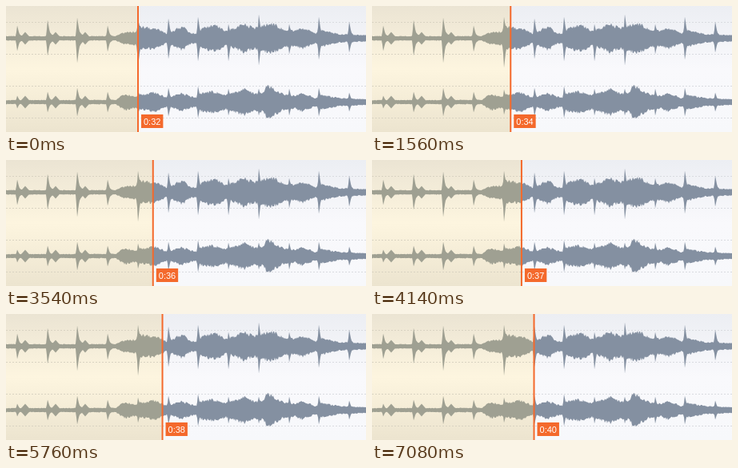
Animation, 450 px wide and 158 px high, one loop 7.14 s. Source, as an HTML page with a canvas:

```html
<!DOCTYPE html>
<html>
<head>
<meta charset="utf-8">
<title>Audio player</title>
<style>
html, body { margin: 0; width: 450px; height: 158px; overflow: hidden; }
canvas { display: block; }
</style>
</head>
<body>
<canvas id="stage" width="450" height="158"></canvas>
<script>
const W = 450, H = 158, LOOP = 7140, STEP = 60;
const ctx = document.getElementById('stage').getContext('2d');

// Loudness over x: [x, top channel, bottom channel]
const body = [
  [0, 2.7, 2.4], [137, 2.7, 2.7], [148, 7.5, 10], [162, 8.5, 7],
  [167, 14, 9], [186, 12.5, 12], [201, 6, 6], [210, 10, 8],
  [220, 15, 11], [231, 6.5, 7], [238, 6, 6], [244, 11, 11],
  [256, 16.5, 13], [266, 14.5, 12], [275, 9, 9], [285, 12.5, 12],
  [297, 17.5, 16], [310, 13, 11], [322, 15.5, 12], [327, 17, 22],
  [333, 18, 17], [348, 11, 9], [361, 9.5, 8], [370, 13, 11.5],
  [387, 6, 5], [395, 10, 8.5], [417, 5, 5], [450, 4, 3.5]
];
// Peak height of each beat
const topUp = [16, 23, 26, 16, 27, 25, 27, 18, 30, 18, 27, 21];
const topDown = [16, 22, 31, 17, 37, 26, 29, 29, 34, 20, 27, 18];
const low = [8, 13, 18, 13, 16, 18, 20, 17, 17, 17, 18, 12];

function noise(n) {
  const s = Math.sin(n * 12.9898) * 43758.5453;
  return s - Math.floor(s);
}

function amplitude(x, column, beats, seed) {
  const i = Math.max(1, body.findIndex(p => p[0] >= x));
  const a = body[i - 1], b = body[i];
  const level = a[column] + (b[column] - a[column]) * (x - a[0]) / (b[0] - a[0]);
  let amp = level * (0.83 + 0.3 * noise(x + seed));
  beats.forEach((peak, k) => {
    const d = x - Math.round(13.8 + 37.75 * k);
    const spike = peak * (1 - Math.abs(d) / (d < 0 ? 2 : 4));
    const tail = d < 0 ? 0 : peak * 0.6 * Math.exp(-d / 5);
    const echo = k < 3 ? 8 * (1 - Math.abs(d - 10) / 7) : 0;
    amp = Math.max(amp, spike, tail, echo);
  });
  return amp;
}

function addChannel(path, y, column, up, down) {
  path.moveTo(0, y);
  for (let x = 0; x <= W; x++) path.lineTo(x, y - amplitude(x, column, up, y));
  for (let x = W; x >= 0; x--) path.lineTo(x, y + amplitude(x, column, down, y + 500));
  path.closePath();
}

function shade(...colors) {
  const g = ctx.createLinearGradient(0, 0, 0, H);
  colors.forEach((c, i) => g.addColorStop(i / (colors.length - 1), c));
  return g;
}

const wave = new Path2D();
addChannel(wave, 40.5, 1, topUp, topDown);
addChannel(wave, 120.5, 2, low, low);
const ahead = { back: shade('#eceef3', '#f9f9fc', '#f7f8fb'), wave: '#8490a1', rule: '#d9dbe0' };
const played = { back: shade('#ebe4d3', '#fdf5df', '#ece4cf'), wave: '#9fa092', rule: '#d9d3c2' };

function drawPart(width, style) {
  ctx.save();
  ctx.beginPath();
  ctx.rect(0, 0, width, H);
  ctx.clip();
  ctx.fillStyle = style.back;
  ctx.fillRect(0, 0, W, H);
  ctx.strokeStyle = style.rule;
  ctx.setLineDash([2, 2]);
  ctx.beginPath();
  for (let y = 20.5; y < H; y += 40) {
    ctx.moveTo(0, y);
    ctx.lineTo(W, y);
  }
  ctx.stroke();
  ctx.fillStyle = style.wave;
  ctx.fill(wave);
  ctx.restore();
}

function draw(now) {
  const t = Math.floor(now % LOOP / STEP) * STEP;
  const x = 164 + t * 0.0053;
  drawPart(W, ahead);
  drawPart(x + 1, played);

  ctx.fillStyle = '#f4692c';
  ctx.fillRect(x, 0, 2, H);
  ctx.fillRect(x + 5, 136, 27.4, 17);
  ctx.fillStyle = '#fff';
  ctx.font = '11px "Liberation Sans", Arial, sans-serif';
  ctx.fillText('0:' + Math.floor(32.95 + t / 1000), x + 8, 148.5);
}

const start = performance.now();
function tick() {
  draw(performance.now() - start);
  requestAnimationFrame(tick);
}
tick();
</script>
</body>
</html>
```
